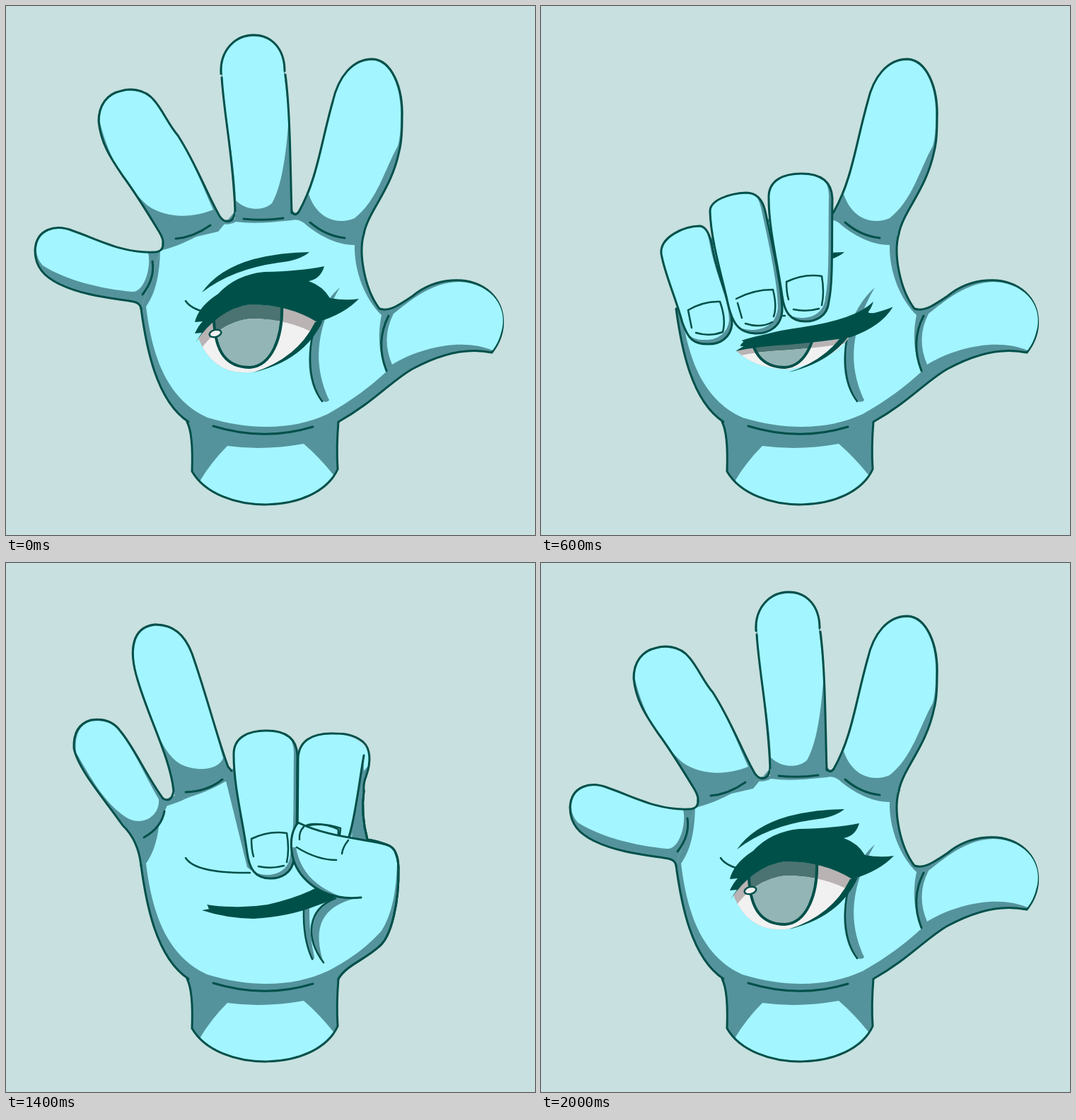
Animation of 748x748 px, one loop 2200 ms. Source, as an HTML page with a canvas:

```html
<!DOCTYPE html>
<html lang="en">
<head>
<meta charset="utf-8">
<title>Counting hand</title>
<style>
html, body { margin: 0; width: 100%; height: 100%; overflow: hidden; background: #c8e0df; }
canvas { display: block; width: 100%; height: 100%; }
</style>
</head>
<body>
<canvas id="stage" width="748" height="748"></canvas>
<script>
const ctx = document.getElementById('stage').getContext('2d');
const BG = '#c8e0df', SKIN = '#a3f5ff', SHADE = '#55939c', INK = '#00504a';
const STEP = 200;

const fill = (d, color) => { ctx.fillStyle = color; ctx.fill(new Path2D(d)); };
const line = (d, w = 3) => {
  ctx.strokeStyle = INK;
  ctx.lineWidth = w;
  ctx.stroke(new Path2D(d));
};

// Blend two paths that share the same commands.
const mix = (a, b, t) => {
  const to = b.match(/\d+/g);
  let i = 0;
  return a.replace(/\d+/g, n => (+n + (to[i++] - n) * t).toFixed(2));
};
const blend = (poses, t) => {
  const i = Math.min(Math.floor(t), poses.length - 2);
  return mix(poses[i], poses[i + 1], t - i);
};

// ---- palm, wrist and thumb
const EDGE = {
  out: 'C520,560 545,530 575,513 C610,494 650,482 687,490 C710,460 706,425 685,405 C655,378 605,385 575,410 C550,427 540,432 528,428 C507,400 498,350 506,322',
  in: 'C482,568 506,562 528,542 C545,528 556,480 555,430 Q554,404 540,399 Q525,393 511,391 C504,365 503,345 506,322'
};
const GLOW = {
  out: 'C490,557 515,538 538,517 C526,490 526,460 531,437 C508,415 492,375 493,338',
  in: 'C492,558 515,538 531,520 C547,495 552,460 553,425 Q550,405 540,401 L489,390 L493,338'
};

function wrist() {
  const d = 'M256,588 Q265,605 263,658 C300,722 440,720 469,655 Q467,625 470,588';
  fill(d + 'Z', SHADE);
  fill('M274,672 Q290,645 313,622 Q365,629 421,619 Q443,638 463,663 C425,715 320,720 274,672Z', SKIN);
  line(d);
}

function palm(thumb) {
  const left = 'M191,428 C198,480 212,558 258,588';
  fill(left + 'L470,588' + EDGE[thumb] + 'L408,292 L312,302 L222,335Z', SHADE);
  fill('M198,425 C206,490 225,555 285,582 C350,602 410,598 455,577' + GLOW[thumb] +
    'C465,338 440,322 425,310 Q415,300 404,303 L372,306 Q345,308 325,305 Q312,312 300,306 C280,322 250,338 218,346 C217,380 212,405 198,425Z', SKIN);
  line(left);
  line('M470,588' + EDGE[thumb]);
  line('M293,594 Q365,616 434,595');
  line('M254,417 Q268,439 345,438', 2.5);
  if (thumb === 'out') {
    fill('M548,435 C570,418 600,391 640,390 C690,392 711,430 700,462 Q697,475 688,487 C650,470 590,480 546,507 Q530,470 548,435Z', SKIN);
    line('M541,438 Q522,475 538,516');
    fill('M472,398 C425,440 415,525 447,559 Q455,561 457,557 C440,520 430,470 472,398Z', SHADE);
    line('M446,437 C424,470 425,530 447,559', 2.5);
  } else {
    fill('M421,490 C420,525 426,545 434,562 L436,558 Q428,520 429,488Z', SHADE);
    line('M421,490 C420,525 426,545 433,560', 2.5);
  }
}

function thumbFold() {
  fill('M413,367 C404,378 402,392 404,408 C408,440 435,465 470,472 L500,473 L540,470 L549,420 Q552,404 540,399 C510,390 455,388 413,367Z', SKIN);
  fill('M404,402 C407,440 440,470 478,473 C440,460 416,438 410,402Z', SHADE);
  fill('M449,565 C423,530 425,490 466,473 L497,473 C450,485 432,510 449,565Z', SHADE);
  line('M449,565 C423,530 425,490 466,474', 2.5);
  line('M540,399 C510,390 455,388 413,367 C404,378 402,392 404,408 C408,440 435,465 470,472 Q485,475 502,473');
  line('M470,588' + EDGE.in);
  line('M421,373 Q414,380 415,391 M411,402 Q440,420 467,420 M484,392 Q476,402 475,411', 2.5);
  line('M428,371 Q450,367 473,375 L472,384', 2.5);
}

// ---- raised fingers: silhouette, light area, fold line; base closes the silhouette
function raised(body, light, fold, { base = '', outline = body } = {}) {
  fill(body + base + 'Z', SHADE);
  fill(light + 'Z', SKIN);
  line(outline);
  line(fold);
}

const up = {
  pinky() {
    raised('M222,335 Q223,348 209,348 C165,350 130,330 95,318 C70,308 43,315 41,345 C41,370 55,383 75,393 C110,410 150,413 180,418 Q190,420 191,428',
      'M201,349 C165,350 130,330 95,319 C70,309 44,315 43,345 Q43,357 52,367 C85,388 135,400 178,404 C195,406 206,370 201,349',
      'M207,361 Q211,385 193,408');
  },
  ring() {
    raised('M324,290 C322,308 309,308 302,297 C285,268 270,225 243,183 C230,168 222,148 210,134 C195,115 172,117 163,120 C143,124 131,140 131,163 C134,195 150,218 165,240 C185,267 200,292 217,320 Q223,330 222,337',
      'M293,288 C278,255 265,220 243,184 C230,169 222,149 210,135 C195,117 172,119 163,121 C143,126 132,142 133,165 C145,215 170,255 200,282 C230,303 268,298 293,288',
      'M240,329 Q265,327 289,310',
      { base: 'L300,319' });
  },
  middle() {
    raised('M324,303 C323,210 308,160 305,97 C300,62 325,41 350,41 C375,41 396,60 394,95 C402,150 403,230 404,293',
      'M325,275 C323,210 308,160 306,97 C302,63 325,43 350,43 C375,43 394,60 393,95 L400,156 C396,215 389,257 376,279 C364,290 340,290 325,275',
      'M336,301 Q365,304 392,300',
      { outline: 'M324,290 C321,210 309,160 305,101 M304,96 C302,62 325,41 350,41 C375,41 394,60 394,92 M395,97 C402,150 402,230 404,293' });
  },
  index() {
    raised('M404,290 Q408,299 414,291 C440,245 445,195 462,135 C470,100 490,75 518,75 C545,76 562,115 560,160 Q560,190 556,205 C545,260 512,290 506,322',
      'M428,266 C443,230 449,185 463,136 C471,101 490,77 518,77 C544,78 560,115 558,160 Q558,185 554,198 C535,232 525,275 493,300 C470,310 440,302 428,266',
      'M430,306 Q452,325 479,328',
      { base: 'L495,333' });
  },
  pinkyNarrow() {
    fill('M183,380 Q193,420 198,460 L214,500 L255,420 L244,355Z', SKIN);
    fill('M184,385 Q190,430 207,500 L222,514 C206,475 200,430 187,387Z', SHADE);
    raised('M246,362 C244,300 238,260 229,225 C222,202 205,195 188,196 C160,198 149,225 152,252 C160,300 172,340 183,380',
      'M243,345 C243,305 237,260 228,225 C221,203 205,198 188,198 C165,200 155,218 155,238 C160,290 173,325 188,364 C200,380 238,377 243,345',
      'M194,381 Q215,384 236,374');
    line('M183,378 Q188,405 193,435 Q197,460 201,475 M246,362 Q251,400 269,431');
  },
  pinkyTilt() {
    raised('M237,322 Q234,340 222,333 C198,300 182,262 162,238 C150,221 133,220 120,222 C103,227 95,240 96,262 C102,292 140,335 165,371 Q187,392 191,428',
      'M216,334 C196,300 180,262 160,238 C149,223 133,222 120,224 C104,229 97,242 99,268 C118,300 140,343 174,362 C197,372 218,355 216,334',
      'M224,351 Q220,374 195,388');
  },
  ringTilt() {
    fill('M309,300 L322,290 L347,435 L341,430Z', SHADE);
    raised('M237,322 C232,275 202,220 186,165 C173,123 178,91 210,87 C240,86 255,107 263,128 C283,185 298,245 314,288 L319,294',
      'M307,276 C297,240 282,185 262,129 C254,108 240,88 210,89 C180,92 175,123 187,168 C205,210 215,265 246,284 C270,296 300,293 307,276',
      'M254,324 Q285,323 306,306',
      { base: 'L318,304 Q285,326 240,336' });
  }
};

// ---- curled fingers: light part sits up and left of the shaded body
function curled(body, nail, dx, dy) {
  ctx.save();
  ctx.clip(new Path2D(body));
  fill(body, SHADE);
  ctx.translate(dx, dy);
  fill(body, SKIN);
  ctx.restore();
  line(body);
  line(nail, 2.5);
}

const curl = {
  pinky() {
    curled('M170,350 C168,327 202,311 225,311 Q238,313 243,345 C252,390 270,422 270,450 C268,470 252,478 238,478 C215,479 208,470 200,448 C190,410 175,380 170,350Z',
      'M208,430 Q230,417 253,418 Q262,443 257,461 M208,430 L213,455 M219,462 Q238,468 257,461', -4, -6);
  },
  ring() {
    curled('M239,290 C239,275 265,265 290,264 Q311,264 317,290 C328,340 341,400 341,430 C340,455 320,463 305,463 C280,463 270,450 263,415 C255,380 240,330 239,290Z',
      'M276,414 Q300,401 328,401 Q334,425 329,439 M278,420 L284,441 M289,449 Q310,456 327,447', -6, -5);
  },
  middle() {
    curled('M322,272 C321,245 345,237 368,237 C395,237 411,247 412,272 C411,340 413,390 407,418 C405,440 387,446 374,446 C352,446 344,432 341,410 C334,360 322,315 322,272Z',
      'M347,390 Q372,378 397,382 Q401,405 397,423 M347,390 Q347,405 350,415 M357,429 Q375,433 393,428', -5, -5);
  },
  index() {
    const body = 'M413,280 C412,250 435,241 460,241 C492,241 516,258 514,282 C513,296 505,305 505,330 L497,350 C492,385 482,405 468,419 C447,435 413,426 412,400Z';
    ctx.save();
    ctx.clip(new Path2D(body));
    fill(body, SHADE);
    ctx.translate(-1, -6);
    fill('M413,280 C412,250 435,240 460,240 L520,240 L520,285 L507,300 L506,278 C498,320 497,360 487,390 C473,425 440,437 412,410Z', SKIN);
    ctx.restore();
    line('M506,322 Q505,312 509,302 C517,280 515,262 505,253 C490,241 475,241 460,241 C435,241 412,250 413,280 L412,400 C415,427 447,435 468,419 C490,400 496,330 506,272');
    line('M418,381 Q419,369 437,369 Q455,369 470,377 Q471,395 460,410 M418,386 L421,407 M427,414 Q445,417 461,410', 2.5);
  }
};

// ---- eye: open, half, shut
const LASH = [
  'M267,477 L277,462 L267,463 Q272,452 278,446 L267,447 Q272,425 300,407 Q325,380 365,376 Q415,375 450,368 Q445,386 428,389 Q448,396 458,413 Q480,417 499,414 Q478,436 440,447 Q400,422 345,422 Q300,428 267,477Z',
  'M273,485 L285,473 L277,474 Q280,468 287,463 L283,463 Q290,452 312,443 Q335,429 365,426 Q450,419 470,399 Q466,410 458,418 Q460,420 468,420 Q485,418 496,415 Q480,436 436,452 Q400,449 350,455 Q305,460 273,485Z',
  'M277,491 L288,489 L286,488 Q286,487 286,486 L284,483 Q300,486 320,486 Q345,487 370,483 Q440,467 470,437 Q468,445 467,448 Q468,450 475,448 Q488,442 499,436 Q482,471 438,485 Q400,500 350,503 Q310,502 277,491Z'
];
const BALL = [
  'M272,470 Q300,428 345,422 Q400,422 440,445 Q425,495 352,517 Q295,526 272,470Z',
  'M275,484 Q305,460 350,455 Q400,449 436,452 Q420,494 352,517 Q300,524 275,484Z',
  'M277,491 Q310,500 350,502 Q400,500 436,485 Q410,505 352,510 Q310,505 277,491Z'
];
const IRIS = 'M294,420 L294,445 C296,490 312,511 345,511 C375,509 392,470 390,420';

function eye(shut) {
  if (shut < 2) {
    const ball = new Path2D(blend(BALL, shut));
    const lid = 20 - 8 * shut;
    ctx.save();
    ctx.clip(ball);
    fill('M260,400 H460 V530 H260Z', '#b9b3b4');
    fill(IRIS, '#4a7371');
    ctx.save();
    ctx.translate(0, lid);
    ctx.clip(ball);
    ctx.translate(0, -lid);
    fill('M260,400 H460 V530 H260Z', '#f1f1f1');
    fill(IRIS, '#93b5b5');
    ctx.restore();
    line(IRIS, 4);
    ctx.restore();
    fill('M350,518 Q412,498 437,447 L448,445 Q422,501 350,518Z', INK);
    fill('M277,405 Q300,372 350,358 Q390,348 429,348 Q415,360 385,363 Q320,372 277,405Z', INK);
  }
  fill(blend(LASH, shut), INK);
  if (shut < 0.6) {
    ctx.beginPath();
    ctx.ellipse(296, 463, 8.5, 5, -0.25, 0, Math.PI * 2);
    ctx.fillStyle = '#f1f1f1';
    ctx.fill();
    ctx.lineWidth = 2.5;
    ctx.stroke();
  }
}

// ---- poses: names of raised fingers, thumb, eye closure, lean of curled fingers
const ALL = ['pinky', 'ring', 'middle', 'index'];
const POSES = [
  [ALL, 'out', 0],
  [['ring', 'middle', 'index'], 'out', 0.5, -0.05],
  [['middle', 'index'], 'out', 1, -0.05],
  [['index'], 'out', 1.5],
  [[], 'out', 2],
  [[], 'in', 2],
  [['pinkyNarrow'], 'in', 2],
  [['pinkyTilt', 'ringTilt'], 'in', 2],
  [['pinky', 'ring', 'middle'], 'in', 1],
  [ALL, 'in', 0.5],
  [ALL, 'out', 0]
];

function draw([fingers, thumb, shut, lean = 0]) {
  ctx.lineCap = ctx.lineJoin = 'round';
  fill('M0,0 H748 V748 H0Z', BG);
  wrist();
  palm(thumb);
  fingers.forEach(name => up[name]());
  eye(shut);
  ctx.save();
  ctx.translate(240, 440);
  ctx.rotate(lean);
  ctx.translate(-240, -440);
  ALL.filter(name => !fingers.some(f => f.startsWith(name))).forEach(name => curl[name]());
  ctx.restore();
  if (thumb === 'in') thumbFold();
}

let start, shown = -1;
function tick(now) {
  start ??= now;
  const i = Math.floor((now - start) / STEP) % POSES.length;
  if (i !== shown) draw(POSES[shown = i]);
  requestAnimationFrame(tick);
}
draw(POSES[0]);
requestAnimationFrame(tick);
</script>
</body>
</html>
```
